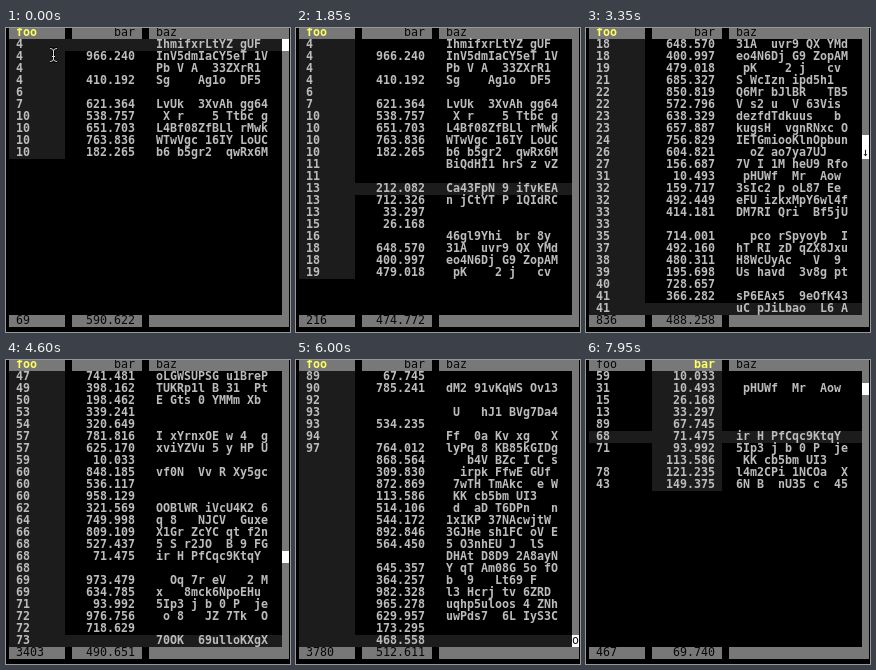
An HTML page that plays this animation: 284 by 304 pixels, repeating every 8000 ms.

```html
<!DOCTYPE html>
<html>
<head>
<meta charset="utf-8">
<style>
html, body { margin: 0; width: 284px; height: 304px; overflow: hidden; background: #000; }
body { position: relative; font: 11.63px/10px "DejaVu Sans Mono", monospace; color: #bcbcbc; }
div { position: absolute; box-sizing: border-box; }
.row { left: 3px; width: 273px; height: 12px; font-weight: bold; }
.row.on { background: #1c1c1c; }
.cell { top: 0; height: 12px; padding: 0 7px; white-space: pre; }
.cell:nth-child(1) { left: 0; width: 56px; }
.cell:nth-child(2) { left: 63px; width: 70px; text-align: right; }
.cell:nth-child(3) { left: 140px; width: 133px; }
.cell.key { background: #1c1c1c; }
.bar { font-weight: normal; color: #080808; }
.bar .cell { background: #787878; }
.bar .cell.key { color: #ffff60; font-weight: bold; background: #787878; }
#track { left: 276px; top: 0; width: 7px; height: 299px; background: #787878; }
#thumb, #mark { left: 0; width: 7px; height: 12px; background: #fff; color: #111; }
#ptr { position: absolute; left: 0; top: 0; }
</style>
</head>
<body>
<div id="track"><div id="mark"></div><div id="thumb"></div></div>
<svg id="ptr" width="9" height="16" fill="none">
  <path id="edge" d="M1 1.5Q4.500 1.500 4.500 4V12Q4.500 14.500 1 14.500M8 1.500Q4.500 1.500 4.500 4M4.500 12Q4.500 14.500 8 14.500M3 9.500H6" stroke="#000" stroke-width="3"/>
  <path d="M1 1.500Q4.500 1.500 4.500 4V12Q4.500 14.500 1 14.500M8 1.500Q4.500 1.500 4.500 4M4.500 12Q4.500 14.500 8 14.500M3 9.500H6" stroke="#ddd"/>
</svg>
<script>
const LOOP = 8000, VIEW = 23, PAGE = 10;

// foo | bar | baz
const rows = `4||IhmifxrLtYZ gUF
4|966.240|InV5dmIaCY5eT 1V
4||Pb V A  33ZXrR1
4|410.192|Sg    Ag1o  DF5
6||
7|621.364|LvUk  3XvAh gg64
10|538.757| X r    5 Ttbc g
10|651.703|L4Bf08ZfBLl rMwk
10|763.836|WTwVgc 16IY LoUC
10|182.265|b6 b5gr2  qwRx6M
11||BiQdHI1 hrS z vZ
11||
13|212.082|Ca43FpN 9 ifvkEA
13|712.326|n jCtYT P 1QIdRC
13|33.297|
15|26.168|
16||46gl9Yhi  br 8y
18|648.570|31A  uvr9 QX YMd
18|400.997|eo4N6Dj G9 ZopAM
19|479.018| pK    2 j   cv
21|685.327|S WcIzn ipd5h1
22|850.819|Q6Mr bJlBR   TB5
22|572.796|V s2 u  V 63Vis
23|638.329|dezfdTdkuus   b
23|657.887|kugsH  vgnRNxc O
24|756.829|IETGmiooKlnOpbun
26|604.821|  oZ ao7ya7UJ
27|156.687|7V I 1M heU9 Rfo
31|10.493| pHUWf  Mr  Aow
32|159.717|3sIc2 p oL87 Ee
32|492.449|eFU izkxMpY6wl4f
33|414.181|DM7RI Qri  Bf5jU
33||
35|714.001|  pco rSpyoyb  I
37|492.160|hT RI zD qZX8Jxu
38|480.311|H8WcUyAc   V  9
39|195.698|Us havd  3v8g pt
40|728.657|
41|366.282|sP6EAx5  9eOfK43
41||uC pJiLbao  L6 A
42|612.408|Rk2 vTq  8 LmZ
43|149.375|6N B  nU35 c  45
43|287.915|
44|455.120|w Q7d JpX 0  hVs
45|731.664|Tb9  Lr yE4 KoMi
46|333.072|
47|518.946|g Z1x  uWc 6RtN
47|741.481|oLGWSUPSG u1BreP
49|398.162|TUKRp1l B 31  Pt
50|198.462|E Gts 0 YMMm Xb
53|339.241|
54|320.649|
57|781.816|I xYrnxOE w 4  g
57|625.170|xviYZVu 5 y HP U
59|10.033|
60|848.185|vf0N  Vv R Xy5gc
60|536.117|
60|958.129|
62|321.569|OOBlWR iVcU4K2 6
64|749.998|q 8   NJCV  Guxe
66|809.109|X1Gr ZcYC qt f2n
68|527.437|5 S r2JO  B 9 FG
68|71.475|ir H PfCqc9KtqY
68||
69|973.479|  Oq 7r eV   2 M
69|634.785|x   8mck6NpoEHu
71|93.992|5Ip3 j b 0 P  je
72|976.756| o 8   JZ 7Tk  O
72|718.629|
73||70OK  69ulloKXgX
74|392.507|Hd 3 mYw  P5 kLa
76|274.318|
78|121.235|l4m2CPi 1NCOa  X
80|640.225|zU 8fG  Sn2 qB t
82||Vj0 Rx  e7 WiD
83|487.093|
85|248.471|cM 4Ty oK9  h Fp
89|67.745|
90|785.241|dM2 91vKqWS Ov13
92||
93|| U   hJ1 BVg7Da4
93|534.235|
94||Ff  0a Kv xg   X
97|764.012|lyPq 8 KB85kGIDg
|868.564|   b4V BZc I C s
|309.830|  irpk FfwE GUf
|872.869| 7wTH TmAkc  e W
|113.586| KK cb5bm UI3
|514.106| d  aD T6DPn   n
|544.172|1xIKP 37NAcwjtW
|892.846|3GJHe sh1FC oV E
|564.450|5 O3nhEU J  lS
||DHAt D8D9 2A8ayN
|645.357|Y qT Am08G 5o fO
|364.257|b  9   Lt69 F
|982.328|l3 Hcrj tv 6ZRD
|965.278|uqhp5uloos 4 ZNh
|629.957|uwPds7  6L IyS3C
|173.295|
|468.558|`.split("\n").map(line => line.split("|"));

const rising = rows.filter(r => r[1]).sort((a, b) => a[1] - b[1]);
const falling = [...rising].reverse();

// cursor runs: start, end, steps, from row, to row
const runs = [
  [750, 1250, 8, 1, 9], [1400, 1400, 1, 9, 10], [1600, 1850, 3, 10, 13],
  [1950, 2350, 7, 13, 20], [2700, 2700, 1, 20, 21], [2850, 2900, 2, 21, 23],
  [3050, 3200, 4, 23, 30], [3350, 3350, 1, 30, 40], [3700, 4200, 8, 40, 60],
  [4400, 4600, 4, 60, 70], [4800, 5150, 7, 70, 80], [5400, 6000, 12, 80, 100],
  [6400, 6400, 1, 1, 1], [7800, 7950, 3, 1, 6]
];
const loads = [1550, 2400, 3200, 3500, 3950, 4400, 4600, 5150, 5700];
const SORT_DOWN = 6400, SORT_UP = 7300;

const moves = runs.flatMap(([t0, t1, n, a, b]) =>
  Array.from({ length: n }, (_, i) => [
    Math.round((t0 + (t1 - t0) * i / (n - 1 || 1)) / 50) * 50,
    Math.round(a + (b - a) * (i + 1) / n)
  ]));

// pointer: time, x, y
const pointer = [[0, 43, 19], [150, 16, 5], [400, 8, 1], [450, 140, 140], [500, 267, 274]];
const POINTER_END = 550;

const $ = id => document.getElementById(id);
const last = (steps, t) => steps.filter(s => s[0] <= t).pop();

function addRow(y, cls) {
  const el = document.createElement("div");
  el.className = cls;
  el.style.top = y + "px";
  for (let i = 0; i < 3; i++) {
    const cell = document.createElement("div");
    cell.className = "cell";
    el.append(cell);
  }
  document.body.insertBefore(el, $("ptr"));
  return el;
}

function fill(el, values, key) {
  [...el.children].forEach((cell, i) => {
    cell.textContent = values[i];
    cell.classList.toggle("key", i === key);
  });
}

const head = addRow(-1, "row bar");
const foot = addRow(287, "row bar");
const lines = Array.from({ length: VIEW }, (_, i) => addRow(11 + 12 * i, "row"));

function totals(list) {
  const bars = list.filter(r => r[1]);
  const foo = list.reduce((sum, r) => sum + +r[0], 0);
  const bar = bars.reduce((sum, r) => sum + +r[1], 0) / bars.length;
  return [foo, bar.toFixed(3), ""];
}

function place(el, slot, text) {
  el.style.top = 11 + 12 * slot + "px";
  el.textContent = text;
}

function draw(data, cur, loaded, key) {
  const list = data.slice(0, loaded);
  const top = Math.max(0, cur - VIEW);
  fill(head, ["foo", "bar", "baz"], key);
  fill(foot, totals(list), -1);
  lines.forEach((el, i) => {
    const row = list[top + i];
    el.style.display = row ? "" : "none";
    el.classList.toggle("on", top + i === cur - 1);
    if (row) fill(el, row, key);
  });
  const slot = Math.floor((cur - 1) * VIEW / 100);
  const more = cur === loaded && cur < 100;
  place($("thumb"), slot, cur === 100 ? "o" : "");
  place($("mark"), slot + 1, "↓");
  $("mark").style.display = more ? "" : "none";
}

let shown = "";
function tick(now) {
  const t = now % LOOP;
  const cur = (last(moves, t) || [0, 1])[1];
  const sorted = t >= SORT_DOWN;
  const loaded = sorted ? PAGE : PAGE * (1 + loads.filter(x => x <= t).length);
  const data = t >= SORT_UP ? rising : sorted ? falling : rows;
  const state = [cur, loaded, sorted, t >= SORT_UP].join();
  if (state !== shown) draw(data, cur, loaded, sorted ? 1 : 0);
  shown = state;

  $("thumb").style.visibility = t >= 1850 && t < 1950 ? "hidden" : "";
  const [, x, y] = last(pointer, t);
  $("ptr").style.display = t < POINTER_END ? "" : "none";
  $("ptr").style.transform = `translate(${x}px, ${y}px)`;
  requestAnimationFrame(at => tick(at - start));
}

const start = performance.now();
tick(0);
</script>
</body>
</html>
```
